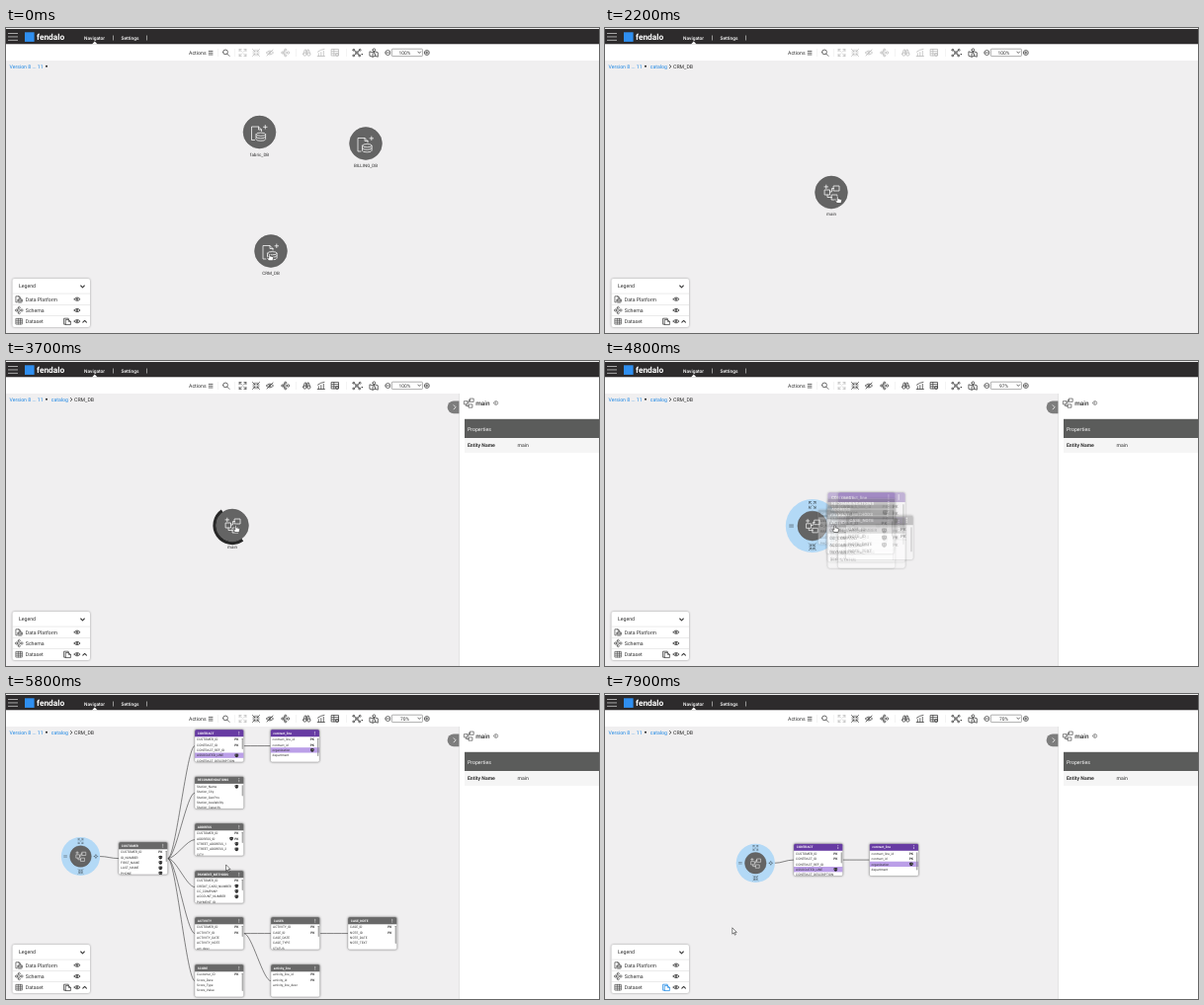
An HTML page for the animation above (8 s loop, 600 by 309 pixels).

```html
<!DOCTYPE html>
<html lang="en">
<head>
<meta charset="utf-8">
<title>Data navigator</title>
<style>
html, body { margin: 0; width: 100%; height: 100%; overflow: hidden; background: #f0eff0; }
svg { display: block; width: 100%; height: 100%; }
text { font-family: Roboto, Arial, sans-serif; font-size: 5.2px; fill: #2f2f2f; text-rendering: geometricPrecision; }
.ico { fill: none; stroke: #3c3c3c; stroke-width: .75; stroke-linecap: round; stroke-linejoin: round; }
.off .ico.dep, .ico.dim { stroke: #b9b9b9; }
.node circle.disc { fill: #646464; stroke: #565656; stroke-width: .6; }
.node .ico, .main .ico { stroke: #fff; }
.label { font-size: 4.5px; text-anchor: middle; }
.arc { fill: none; stroke: #272727; stroke-width: 3.4; }
.link { fill: #1e88e5; }
.bold { font-weight: 700; }
.white { fill: #fff; }
.card { filter: drop-shadow(0 .6px 1.2px rgba(0,0,0,.38)); }
.tbl text { font-size: 4.6px; }
.tbl text.white { fill: #fff; font-weight: 700; }
.edge { fill: none; stroke: #444; stroke-width: .65; }
.sel .ico { stroke: #1e88e5; }
</style>
</head>
<body>
<svg id="stage" viewBox="0 0 600 309" preserveAspectRatio="none">
  <defs><clipPath id="clip"><rect width="71" height="47" rx="2.5"/></clipPath></defs>
</svg>
<script>
const stage = document.getElementById('stage');
function el(tag, attrs, parent = stage, text) {
  const e = document.createElementNS('http://www.w3.org/2000/svg', tag);
  for (const k in attrs) e.setAttribute(k, attrs[k]);
  if (text !== undefined) e.textContent = text;
  parent.appendChild(e);
  return e;
}
const group = (parent, cls = '') => el('g', { class: cls }, parent);
const rect = (p, x, y, width, height, fill, rx = 0) => el('rect', { x, y, width, height, fill, rx }, p);
const label = (p, x, y, s, cls = '', style = '') => el('text', { x, y, class: cls, style }, p, s);
const set = (e, k, v) => e.setAttribute(k, v);
const show = (e, o) => { e.style.display = o > 0 ? '' : 'none'; e.style.opacity = o; };
const move = (e, x, y, s = 1) => set(e, 'transform', `translate(${x} ${y}) scale(${s})`);

const ring = (x, y, r) => `M${x - r} ${y}a${r} ${r} 0 1 0 ${2 * r} 0a${r} ${r} 0 1 0 ${-2 * r} 0`;
const box = (x, y, w, h) => `M${x} ${y}h${w}v${h}h${-w}z`;
const corners = f => [[1, 1], [-1, 1], [1, -1], [-1, -1]].map(([a, b]) => f(a, b)).join('');
const eye = 'M-3.6 0Q0-4 3.6 0Q0 4-3.6 0' + ring(0, 0, 1);
const schema = box(2.5, -6.5, 5.5, 5) + box(-6.5, -2.5, 5, 5) + box(.5, 2.5, 5.5, 5) +
  'M-1.5-.5H.5V-4H2.5M-4 2.5V5H.5';
const database = 'M-4.5 7H-7.5V-6.5H-.5L2.5-3.5V-2M-.5-6.5V-3.5H2.5M-3 1.2a4.8 1.6 0 1 0 9.6 0a4.8 1.6 0 1 0-9.6 0' +
  'V6.2a4.8 1.6 0 0 0 9.6 0V1.2M-3 3.7a4.8 1.6 0 0 0 9.6 0';
const plus = (x, y) => `M${x - 1.8} ${y}h3.6M${x} ${y - 1.8}v3.6`;
const icons = {
  search: ring(-.6, -.6, 2.4) + 'M1.2 1.2L3.4 3.4',
  expand: corners((a, b) => `M${3.4 * a} ${1.4 * b}V${3.4 * b}H${1.4 * a}M${3.4 * a} ${3.4 * b}L${a} ${b}`),
  collapse: corners((a, b) => `M${a} ${3 * b}V${b}H${3 * a}M${a} ${b}L${3.5 * a} ${3.5 * b}`),
  eye, hide: eye + 'M-3 3L3-3',
  fan: ring(-2.8, 0, 1.2) + ring(0, -2.8, 1.1) + ring(0, 2.8, 1.1) + ring(2.8, 0, 1.2) + 'M-1.6 0H1.6M-2-.8L-.8-2M-2 .8L-.8 2',
  find: ring(-2, 1.6, 1.6) + ring(2, 1.6, 1.6) + 'M-3.4 1L-2-3H-.6V1M3.4 1L2-3H.6V1M-.6-1H.6',
  chart: 'M-3.6 3.5H3.6M-2.5 3.5V.8M0 3.5V-.4M2.5 3.5V-1.6M-3.4-.8L-.5-2.6L3.2-3.6',
  grid: box(-3.5, -3.5, 7, 6.5) + 'M-3.5-1.4H3.5M-3.5.8H3.5M-1.2-3.5V3' + ring(2, 2, 1.5),
  net: ring(0, 0, 1.2) + ring(-3, -2.6, .9) + ring(3, -2.6, .9) + ring(-3, 2.8, .9) + ring(2.6, 2.8, .9) +
    'M-2.3-2L-.9-.8M2.3-2L.9-.8M-2.3 2.2L-.9.9M2 2.2L.9.9',
  map: 'M-3.8-1L-1.2-.2L1.2-1L3.8-.2V4L1.2 3.2L-1.2 4L-3.8 3.2zM-1.2 1V4M1.2 1V3.2' + ring(0, -2.6, 1.3) + 'M0-1.3V1',
  minus: ring(0, 0, 2.5) + 'M-1.2 0H1.2', add: ring(0, 0, 2.5) + 'M-1.2 0H1.2M0-1.2V1.2',
  info: ring(0, 0, 2) + 'M0-.2V1M0-1V-.9',
  schema, database,
  filter: 'M-1.4 3H-3.4V-3H1.2V-2.2M-1.4-1.6H1.4L3.4.2V3.4H-1.4zM1.4-1.6V.2H3.4',
  table: box(-3.2, -3, 6.4, 6) + 'M-3.2-1H3.2M-3.2 1H3.2M-1-3V3M1.2-3V3',
  lines: 'M-2-1H2M-2 1H2', gear: ring(0, 0, 1.8) + 'M-2.8 0H-1.8M1.8 0H2.8M0-2.8V-1.8M0 1.8V2.8'
};
function icon(p, name, x, y, s = 1, cls = '') {
  return el('path', { d: icons[name], class: 'ico ' + cls, transform: `translate(${x} ${y}) scale(${s})` }, p);
}

// canvas nodes
const dbNodes = [['fabric_DB', 256.5, 105.5], ['BILLING_DB', 364, 117], ['CRM_DB', 268, 226]].map(([name, x, y]) => {
  const g = group(stage, 'node');
  move(g, x, y);
  el('circle', { r: 16.4, class: 'disc' }, g);
  icon(g, 'database', -.5, 1);
  el('path', { d: plus(5.8, -5.2), class: 'ico' }, g);
  label(g, 0, 24, name, 'label');
  return g;
});
const arc = el('path', { d: 'M0-17.9A17.9 17.9 0 0 1 0 17.9', class: 'arc' });

const edgeLayer = group(stage);
const main = group(stage, 'main');
const halo = group(main);
el('circle', { r: 28, fill: '#b3d9f6' }, halo);
[['expand', 0, -22], ['collapse', 0, 22], ['lines', -22, 0], ['gear', 22, 0]]
  .forEach(([n, x, y]) => { icon(halo, n, x, y, 1).style.stroke = '#4d5d69'; });
const mainNode = group(main, 'node');
el('circle', { r: 16.4, class: 'disc' }, mainNode);
icon(mainNode, 'schema', 0, 0);
el('path', { d: plus(-5.2, -5.6), class: 'ico' }, mainNode);
const mainLabel = label(main, 0, 23.3, 'main', 'label');

// fields: + key, * masked, ! highlighted; mid and end are places while unfolding and at rest
const C = [114, 191, 268, 346], R = [36, 83.6, 131, 179, 226, 274];
const specs = {
  CUSTOMER: [142, 153, C[0], 150, 'CUSTOMER_ID+ ID_NUMBER* FIRST_NAME* LAST_NAME* PHONE*'],
  CONTRACT: [204, 40.8, C[1], R[0], 'CUSTOMER_ID+ CONTRACT_ID+ CONTRACT_REF_ID ASSOCIATED_LINE!* CONTRACT_DESCRIPTION'],
  contract_line: [270, 40.8, C[2] - .5, R[0], 'contract_line_id+ contract_id+ organization!* department'],
  RECOMMENDATIONS: [204, 81.5, C[1], R[1], 'Station_Name* Station_City Station_GeoPos Station_Availability Station_Capacity'],
  ADDRESS: [204, 122.3, C[1], R[2], 'CUSTOMER_ID+ ADDRESS_ID+* STREET_ADDRESS_1* STREET_ADDRESS_2* CITY'],
  ACTIVITY: [204, 203.6, C[1], R[4], 'CUSTOMER_ID+ ACTIVITY_ID+ ACTIVITY_DATE ACTIVITY_NOTE act_desc'],
  SCORE: [204, 244.2, C[1], R[5], 'Customer_ID+ Score_Date Score_Type Score_Value'],
  CASES: [270, 203.6, C[2], R[4], 'ACTIVITY_ID+ CASE_ID+ CASE_DATE CASE_TYPE STATUS'],
  activity_line: [270, 244.2, C[2], R[5], 'activity_line_id+ activity_id+ activity_line_desc'],
  PAYMENT_METHODS: [197.5, 151.5, C[1], R[3], 'CUSTOMER_ID+ CREDIT_CARD_NUMBER* CC_COMPANY* ACCOUNT_NUMBER* PAYMENT_ID'],
  CASE_NOTE: [321.3, 189.5, C[3], R[4], 'CASE_ID+ NOTE_ID+ NOTE_DATE NOTE_TEXT']
};
const tables = {};
for (const name in specs) {
  const [mx, my, ex, ey, list] = specs[name];
  const fields = list.split(' '), purple = /^contract/i.test(name);
  const g = group(stage, 'tbl card'), body = group(g);
  set(body, 'clip-path', 'url(#clip)');
  rect(body, 0, 0, 71, 47, '#fff');
  rect(body, 0, 0, 71, 10.4, purple ? '#673ba3' : '#686868');
  label(body, 4, 6.9, name, 'white');
  for (const y of [3.2, 5.2, 7.2]) el('circle', { cx: 64, cy: y, r: .7, fill: '#fff' }, body);
  fields.forEach((f, i) => {
    const y = 14.6 + 7.6 * i;
    if (f.includes('!')) rect(body, 0, y - 3.8, 71, 7.6, '#bb9fe8');
    label(body, 3, y + 1.7, f.replace(/[+*!]/g, ''));
    if (f.includes('+')) label(body, 57.5, y + 1.7, 'PK', 'bold');
    if (f.includes('*')) {
      const x = f.includes('+') ? 53 : 60.5;
      el('path', { d: `M${x - 2.6} ${y - 2}q2.6-1 5.2 0v2q-.4 2.8-2.6 2.8t-2.6-2.8z`, fill: '#2b2b2b' }, body);
      for (const d of [-1.1, 1.1]) el('circle', { cx: x + d, cy: y - .4, r: .5, fill: '#fff' }, body);
    }
  });
  if (fields.length > 3) rect(body, 68.2, 12.5, 1.4, fields.length > 4 ? 16 : 26, '#8a8a8a', .7);
  el('rect', { width: 71, height: 47, rx: 2.5, fill: 'none', stroke: '#999', 'stroke-width': .5 }, g);
  tables[name] = { g, mid: [mx, my], end: [ex, ey] };
}
const edges = [['main', 'CUSTOMER'], ['main', 'CONTRACT'], ['CONTRACT', 'contract_line'], ['ACTIVITY', 'CASES'],
  ['ACTIVITY', 'activity_line'], ['CASES', 'CASE_NOTE'],
  ...['CONTRACT', 'RECOMMENDATIONS', 'ADDRESS', 'PAYMENT_METHODS', 'ACTIVITY', 'SCORE'].map(n => ['CUSTOMER', n])
].map(([a, b]) => ({ a, b, path: el('path', { class: 'edge' }, edgeLayer) }));

// breadcrumb
label(stage, 3.5, 40.6, 'Version 8 ... 11', 'link');
el('circle', { cx: 41, cy: 38.8, r: 1, fill: '#222' });
const crumb = group(stage);
label(crumb, 45.8, 40.6, 'catalog', 'link');
el('path', { d: 'M65.3 37.3l1.7 1.7l-1.7 1.7', class: 'ico' }, crumb);
label(crumb, 69, 40.6, 'CRM_DB');

// legend
const legend = group(stage, 'card');
rect(legend, 6.5, 254, 78.5, 49, '#fff', 2);
for (const y of [268.8, 280.4, 291.5]) rect(legend, 6.5, y, 78.5, .5, '#d6d6d6');
label(legend, 13, 262.9, 'Legend');
el('path', { d: 'M75.7 261l1.8 1.8l1.8-1.8M77.8 298.2l1.8-1.8l1.8 1.8', class: 'ico', style: 'stroke-width:1.1' }, legend);
[['database', 'Data Platform', 274.7], ['fan', 'Schema', 286], ['table', 'Dataset', 297.2]].forEach(([n, s, y], i) => {
  icon(legend, n, 13.3, y, i ? .95 : .45).style.strokeWidth = i ? .65 : 1.5;
  label(legend, 19.8, y + 1.9, s);
  icon(legend, 'eye', 72, y, .85).style.strokeWidth = 1;
});
const filterBtn = group(legend);
const filterBg = rect(filterBtn, 57.8, 293, 8.4, 8.4, 'none', 1);
icon(filterBtn, 'filter', 62, 297.2);

// side panel
function panel(icn, name, infoX, size, rows) {
  const g = group(stage);
  el('path', { d: 'M459 40.4H453a6.4 6.4 0 0 0 0 12.8H459z', fill: '#7d7d7d' }, g);
  el('path', { d: 'M453 44.7l2.1 2.1l-2.1 2.1', class: 'ico', style: 'stroke:#fff' }, g);
  rect(g, 458.4, 33, .6, 276, '#dadada');
  rect(g, 459, 33, 142, 276, '#fff');
  icon(g, icn, 468, 42.3, .65).style.strokeWidth = .95;
  label(g, 475.3, 44.8, name, '', `font-size:${size}px;font-weight:500`);
  icon(g, 'info', infoX, 42.5).style.strokeWidth = .5;
  rect(g, 464, 58.8, 137, 19.2, '#5b5c5b');
  label(g, 467, 70.5, 'Properties', 'white');
  rect(g, 464, 78, 137, 6.8 + 8.2 * rows.length, '#f5f5f5');
  rows.forEach(([k, v], i) => {
    label(g, 467, 87.2 + 8.1 * i, k, 'bold', 'font-size:5.1px');
    label(g, 517.5, 87.2 + 8.1 * i, v, '', 'font-size:5.1px');
  });
  return g;
}
const crmPanel = panel('database', 'CRM_DB', 506.7, 6.1, [
  ['URL', 'jdbc:sqlite:/opt/apps/fabric/share/DB'], ['Entity Name', 'CRM_DB'], ['Type', 'SQLite']]);
const mainPanel = panel('schema', 'main', 495.7, 6.4, [['Entity Name', 'main']]);

// header and toolbar
rect(stage, 0, 0, 600, 1, '#eee');
rect(stage, 0, 1, 600, 15.5, '#2d2b2c');
for (const y of [5.3, 8.6, 11.9]) rect(stage, 2, y, 10, .7, '#ddd');
rect(stage, 19, 4.3, 9.6, 9.6, '#2f8ff0');
label(stage, 31, 12.4, 'fendalo', 'white bold', 'font-size:8.4px');
label(stage, 79, 11.9, 'Navigator', 'white', 'font-size:4.85px;font-weight:500');
label(stage, 116.5, 11.9, 'Settings', 'white', 'font-size:4.85px;font-weight:500');
for (const x of [108, 142.4]) rect(stage, x, 7.5, .6, 5, '#ddd');
el('path', { d: 'M87 16.6l2.8-3l2.8 3z', fill: '#fff' });
const bar = group(stage);
rect(bar, 0, 16.5, 600, 16.5, '#fff');
label(bar, 185, 26.7, 'Actions');
el('path', { d: 'M205.2 23.4h3.8M205.2 25.2h3.8M205.2 27h3.8', class: 'ico' }, bar);
for (const x of [214.5, 231, 293.5, 344.5]) rect(bar, x, 21, .4, 8, '#e2e2e2');
icon(bar, 'search', 222.6, 25);
const expandBtn = icon(bar, 'expand', 239.5, 25, 1, 'dep');
[['collapse', 253], ['hide', 267], ['fan', 282.8], ['find', 304.3], ['chart', 318.8], ['grid', 333]]
  .forEach(([n, x]) => icon(bar, n, x, 25, 1, 'dep'));
icon(bar, 'net', 355, 25, 1.05);
el('path', { d: 'M359.3 26l2 0l-1 1.4z', fill: '#333' }, bar);
icon(bar, 'map', 372.3, 25, 1.05);
icon(bar, 'minus', 386.3, 25);
icon(bar, 'add', 425.8, 25);
el('rect', { x: 390.4, y: 21.2, width: 31, height: 7.4, rx: .8, fill: '#fff', stroke: '#777', 'stroke-width': .6 }, bar);
const zoomText = label(bar, 403.5, 26.7, '100%', '', 'font-size:4.9px;text-anchor:middle');
el('path', { d: 'M416.8 24l1.4 1.5l1.4-1.5', class: 'ico' }, bar);

// pointers, tip at the origin
const arrow = el('path', { d: 'M0 0V6.4L1.5 5L2.6 7.4L3.6 6.9L2.5 4.6H4.5z', fill: '#fff', stroke: '#222', 'stroke-width': .55 });
const hand = el('path', {
  d: 'M-.7.4Q0-.6.7.4V2.6L3.6 3.2Q4.3 3.5 4.1 4.6L3.4 7.2H-.8L-2.6 4.6Q-2.6 3.5-1.6 4L-.7 4.8z',
  fill: '#fff', stroke: '#222', 'stroke-width': .55
});

const clamp = v => Math.max(0, Math.min(1, v));
const lerp = (a, b, p) => a + (b - a) * p;
const prog = (t, a, b) => clamp((t - a) / (b - a));
const ease = p => p * p * (3 - 2 * p);
const span = (t, a, b) => ease(prog(t, a, b));
// value at t along [time, ...values] keys
function along(t, keys) {
  let i = 0;
  while (i < keys.length - 2 && t >= keys[i + 1][0]) i++;
  const [t0, ...a] = keys[i], [t1, ...b] = keys[i + 1];
  const p = span(t, t0, t1);
  return a.map((v, k) => lerp(v, b[k], p));
}
const OPEN = 4700, MID = 5100, REST = 5500, FILTER = 7100;
const pointerKeys = [[0, 266.5, 228.5], [600, 266.5, 228.5], [1100, 290.5, 225.3], [1900, 290.5, 222], [2200, 235.5, 170.3],
  [2400, 232.5, 166.3], [4800, 232.5, 166.3], [5100, 233.5, 164.5], [5600, 233.5, 164.5],
  [6900, 62.2, 297.2], [7200, 62.2, 297.2], [7800, 128.8, 236.8], [8000, 128.8, 236.8]];
const mainKeys = [[0, 229, 166.5], [OPEN, 229, 166.5], [MID, 106.3, 170], [REST, 75.5, 164.5],
  [7200, 75.5, 164.5], [7700, 152.3, 171.3], [8000, 152.3, 171.3]];
const zoomKeys = [[0, 1], [OPEN, 1], [MID, .78], [REST, .7], [8000, .7]];

function render(t) {
  const inMain = t >= 1600, open = t > OPEN, only = t >= FILTER;

  const dim = lerp(1, .42, span(t, 200, 700)), gone = 1 - span(t, 1500, 1700);
  dbNodes.forEach((g, i) => show(g, gone * (i < 2 ? dim : 1)));
  const spinCrm = t >= 300 && t < 1600, spinMain = t >= 2600 && t <= OPEN;
  show(arc, spinCrm || spinMain ? 1 : 0);
  if (spinCrm) set(arc, 'transform', `translate(268 226) rotate(${5 + (t - 1100) * .36})`);
  if (spinMain) set(arc, 'transform', `translate(229 166.5) rotate(${145 + (Math.min(t, 4600) - 3700) * .36})`);

  show(crmPanel, t >= 300 && t < 1800 ? 1 : 0);
  move(crmPanel, 156 * (1 - span(t, 200, 700) + span(t, 1500, 1800)), 0);
  show(mainPanel, t >= 2700 ? 1 : 0);
  move(mainPanel, 156 * (1 - span(t, 2600, 3200)), 0);
  set(bar, 'class', t < 300 || (t >= 1600 && t < 2700) ? 'off' : '');
  expandBtn.classList.toggle('dim', open);
  show(crumb, inMain ? 1 : 0);

  const [zoom] = along(t, zoomKeys), [x, y] = along(t, mainKeys);
  zoomText.textContent = Math.round(zoom * 100) + '%';
  show(main, span(t, 1500, 1900));
  move(main, x, y, zoom);
  set(mainNode, 'transform', `scale(${open ? .94 : 1})`);
  show(halo, open ? 1 : 0);
  show(mainLabel, open ? 0 : 1);

  const fade = prog(t, OPEN, 5000), settle = span(t, 7200, 7700), drop = 115.5 * settle;
  const ports = { main: { l: x, r: x + 27 * zoom, y } };
  for (const name in tables) {
    const { g, mid, end } = tables[name];
    const kept = /^contract/i.test(name);
    show(g, open && (kept || !only) ? fade : 0);
    const [tx, ty] = along(t, [[OPEN, 229, 150], [MID, ...mid], [REST, ...end], [8000, ...end]]);
    const small = name === 'CUSTOMER' ? lerp(.78, 1, span(t, MID, REST)) : 1;
    const s = zoom * small, top = ty + (kept ? drop : 0);
    move(g, tx, top, s);
    ports[name] = { l: tx, r: tx + 71 * s, y: top + 23.7 * s };
  }
  for (const { a, b, path } of edges) {
    const direct = a === 'main' && b === 'CONTRACT';
    const on = only ? direct || a === 'CONTRACT' : !direct;
    show(path, open && on ? fade : 0);
    const p = ports[a], q = ports[b], c = Math.min(8, Math.abs(q.l - p.r) / 2);
    const ay = direct ? p.y - 3.5 * (1 - settle) : p.y;
    set(path, 'd', `M${p.r} ${ay}C${p.r + c} ${ay} ${q.l - c} ${q.y} ${q.l} ${q.y}`);
  }

  set(filterBtn, 'class', only ? 'sel' : '');
  filterBg.style.fill = only && t < 7500 ? '#cfe6fa' : 'none';

  const [px, py] = along(t, pointerKeys);
  const pointing = t < 800 || (t >= 2200 && t < 5700) || (t >= 6700 && t < 7400);
  show(hand, pointing ? 1 : 0);
  show(arrow, pointing ? 0 : 1);
  move(pointing ? hand : arrow, px, py);
}

const LOOP = 8000, STEP = 100, start = performance.now();
function tick() {
  const t = (performance.now() - start) % LOOP;
  render(Math.floor(t / STEP) * STEP);
  requestAnimationFrame(tick);
}
tick();
</script>
</body>
</html>
```
